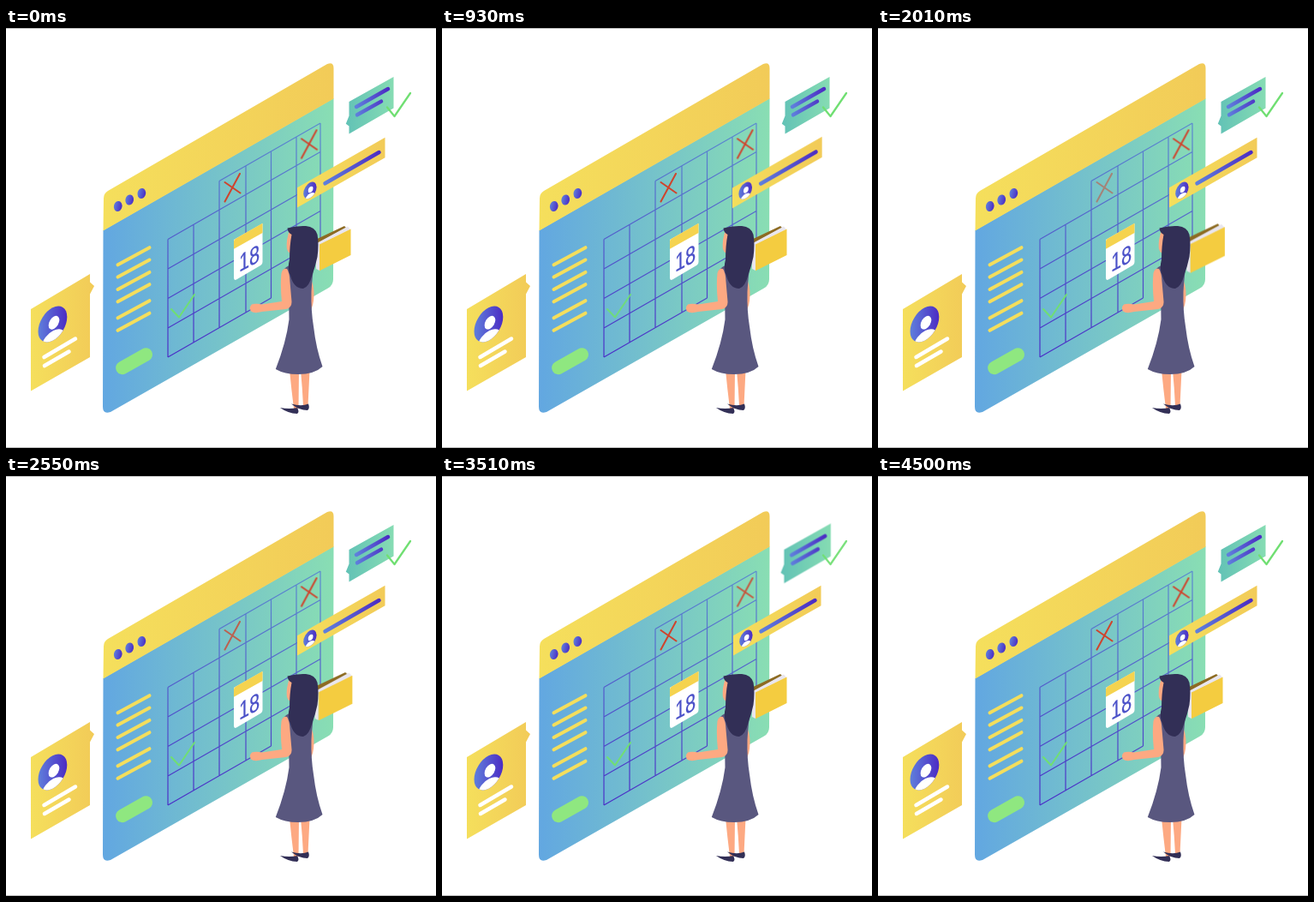
These frames come from a looping animation (502 by 490 pixels, 4.53 s). An HTML page:

```html
<!DOCTYPE html>
<html lang="en">
<head>
<meta charset="utf-8">
<title>Planner</title>
<style>
  html, body { margin: 0; width: 100%; height: 100%; overflow: hidden; background: #fff; }
  svg { display: block; width: 502px; height: 490px; }

  .line { fill: none; stroke-linecap: round; stroke-width: 4.5; }
  .mark { fill: none; stroke-linecap: round; stroke-linejoin: round; stroke-width: 2; }
  .cross { stroke: #d0432c; }
  .tick { stroke: #70df72; }
  .skin { fill: #fda982; }
  .dark { fill: #322f56; }

  .pop, .card, .arm, .mark { animation: pop 4530ms linear infinite; }
  .card { animation-name: card; transform-origin: 66px 355px; }
  .arm { animation-name: reach; transform-origin: 327px 285px; }
  .bar { animation-delay: 877ms; transform-origin: 391px 168.5px; }
  .book { animation-delay: 1755ms; transform-origin: 379px 257px; }
  .bubble { animation-delay: 2640ms; transform-origin: 425px 90px; }
  .day { animation-delay: 3510ms; transform-origin: 283px 261px; }

  .mark { animation-name: fade; }
  .mark.first { animation-name: dim; }
  .x1 { animation-delay: 1665ms; }
  .x2 { animation-delay: 2550ms; }
  .last { animation-delay: 3450ms; stroke-width: 2.3; }

  @keyframes pop {
    0%, 21.96%, 100% { transform: scale(1); }
    8.61%, 13.3% { transform: scale(1.155); }
  }
  @keyframes card {
    0%, 20.3%, 100% { transform: scale(1); }
    8.61%, 13.4% { transform: scale(1.16); }
  }
  @keyframes reach {
    0%, 20.3%, 100% { transform: rotate(0deg); }
    8.61%, 13.4% { transform: rotate(58deg); }
  }
  @keyframes fade {
    0%, 23.18%, 100% { opacity: 1; }
    8.61%, 14.57% { opacity: .45; }
  }
  @keyframes dim {
    0%, 21.96%, 100% { opacity: 1; }
    8.61%, 13.4% { opacity: .45; }
  }
</style>
</head>
<body>
<svg viewBox="0 0 502 490" xmlns="http://www.w3.org/2000/svg">
  <defs>
    <linearGradient id="gold"><stop stop-color="#f5df5c"/><stop offset="1" stop-color="#f2cb58"/></linearGradient>
    <linearGradient id="sea"><stop stop-color="#62a7e1"/><stop offset="1" stop-color="#89deb3"/></linearGradient>
    <linearGradient id="mint"><stop stop-color="#62c2b6"/><stop offset="1" stop-color="#86dcb3"/></linearGradient>
    <linearGradient id="ink"><stop stop-color="#5f7fdc"/><stop offset="1" stop-color="#4c2cc4"/></linearGradient>
    <linearGradient id="grid" gradientUnits="userSpaceOnUse" x1="0" y1="111" x2="0" y2="384">
      <stop stop-color="#5b8ad0"/><stop offset="1" stop-color="#4a2cc6"/>
    </linearGradient>
    <clipPath id="disc"><circle r="19.2"/></clipPath>
    <g id="face">
      <circle r="19.2" fill="url(#ink)"/>
      <g clip-path="url(#disc)" fill="#fff">
        <circle cx="1.8" cy="-1" r="7.2"/>
        <ellipse cx="1" cy="19" rx="15" ry="11"/>
      </g>
    </g>
    <ellipse id="dot" rx="4.8" ry="6.1" fill="url(#ink)" transform="rotate(12)"/>
    <path id="row" d="M130.500 276.300L167.500 256.200"/>
    <path id="cross" d="M273 170L255.500 202.500M255.500 180L273.500 192.500"/>
  </defs>

  <rect width="502" height="490" fill="#fff"/>
  <path d="M0 .5H502M0 489.500H502" stroke="#bdbdbd"/>

  <!-- window -->
  <path fill="url(#sea)" d="M113.500 236L382.500 82L382 293Q382 300 376 303.500L122 448Q113 451 113 442Z"/>
  <path fill="url(#gold)" d="M113.500 236.500L114 199Q114 193 119 190L375 42Q382.500 39 382.500 47V82.500Z"/>
  <use href="#dot" x="0" y="0" transform="translate(130.700 208)"/>
  <use href="#dot" transform="translate(144.200 200.500)"/>
  <use href="#dot" transform="translate(158.300 193)"/>
  <g class="line" stroke="#f4de5c" style="stroke-width:4">
    <use href="#row"/><use href="#row" y="14.300"/><use href="#row" y="28.700"/>
    <use href="#row" y="43"/><use href="#row" y="62"/><use href="#row" y="76.500"/>
  </g>
  <path class="line" d="M135.800 396.400L163.300 381" stroke="#8fe780" style="stroke-width:15.500"/>

  <path fill="none" stroke="url(#grid)" stroke-width="1.200" d="
    M249 178.500L367 111M189 246.500L367 144.500M189 281L367 179M189 315.500L367 213.500M189 350L367 248M189 384L309.500 315
    M189 246.500V384M219 229.500V367M249 178.500V349.500M280 161V332M309.500 144V315M339 127V263M367 111V248"/>

  <use href="#cross" class="mark cross x1"/>
  <use href="#cross" class="mark cross x2" x="89.500" y="-50.700"/>
  <path class="mark tick first" d="M193 328L202 337.500L220 311"/>

  <!-- profile card -->
  <g class="card">
    <path fill="url(#gold)" d="M29 328L98 287V296.500L103 301L98 310.500V384L29 423.500Z"/>
    <use href="#face" transform="matrix(.88 -.44 0 1 54.400 345.500)"/>
    <path class="line" stroke="#fff" d="M44.500 384L81 362.500M45 394L73.500 377.500"/>
  </g>

  <!-- message bar -->
  <g class="pop bar">
    <path fill="url(#gold)" d="M340 186.300L442.500 127.700V151.200L340 209.500Z"/>
    <use href="#face" transform="matrix(.4 -.2 0 .47 354.900 189.300)"/>
    <path class="line" stroke="url(#ink)" d="M372.500 181.300L435.500 145"/>
  </g>

  <!-- speech bubble -->
  <g class="pop bubble">
    <path fill="url(#mint)" d="M400.500 86L452.500 57V93.500L400.500 123.500V114.500L396.800 111.800L400.500 102.500Z"/>
    <path class="line" stroke="url(#ink)" d="M409 92L446 71M410 101.300L438 85.600"/>
  </g>
  <path class="mark tick last" d="M445 92.500L453.500 103L472 76"/>

  <!-- day sheet -->
  <g class="pop day">
    <path fill="#fff" d="M266 247L299.500 228V273Q299.500 275.500 297.500 276.700L269 293.500Q266 295 266 291.500Z"/>
    <path fill="#f5d34f" d="M266 249Q266 246.800 268 245.700L299.500 227.800V239L266 257.800Z"/>
    <text transform="matrix(.75 -.4 0 1 284 278.500)" text-anchor="middle" font-family="'Liberation Sans', Arial, sans-serif" font-size="29" fill="#4a50c8" stroke="#4a50c8" stroke-width=".3">18</text>
  </g>

  <!-- book -->
  <g class="pop book">
    <path fill="#8d6b22" d="M358 248.500L395 231L397 233L362 252Z"/>
    <path fill="#e9e6ee" d="M361 252L399 231.500L402 235L366 253V283L362 281Z"/>
    <path fill="#f4cc40" d="M366 252.500L402.500 234.500V265L366 283.200Z"/>
  </g>

  <!-- woman -->
  <path class="skin" d="M354 288Q360 300 359.500 312Q359 325 355 330Z"/>
  <path class="skin" d="M331 399H342L341.500 444H336Q333 420 331 399ZM344 399H354.500L352.500 441H347Q346 420 344 399Z"/>
  <path class="dark" d="M320 443Q331 445 340 443Q343 448 340 450Q329 449.500 320 443ZM333 438.500Q345 442 353 438.500Q355 444 352 446Q342 446 333 438.500Z"/>
  <path class="skin" d="M331 236Q327 247 327.800 257Q329 263 334 263L340 274V240Z"/>
  <path fill="#59577f" d="M323 283Q332 273 345 273Q357 275 358.500 284Q357 298 356.500 308Q356 330 359 348Q362 374 369.500 395Q360 404 341 404Q325 404 314.800 398Q327 367 330.500 340Q331 322 328.500 303Q321 294 323 283Z"/>
  <path class="arm skin" d="M321.500 286Q323 280 328 281Q331 285 331.500 296L333.500 319Q334 326 327 328L299 331Q290 333.500 286 330.500Q283.500 326 287 322.500Q292 321 299 322.500L322 319Q320 300 321.500 286Z"/>
  <path class="dark" d="M328.500 233.500Q338 230.500 350 231Q361 232 363.500 241Q365.500 252 363.500 267Q361 279 357.500 288Q354 302 347 304Q336 304 332 289Q328 281 331 270Q331 254 333.500 241Q329 239 328.500 233.500Z"/>
</svg>
</body>
</html>
```
